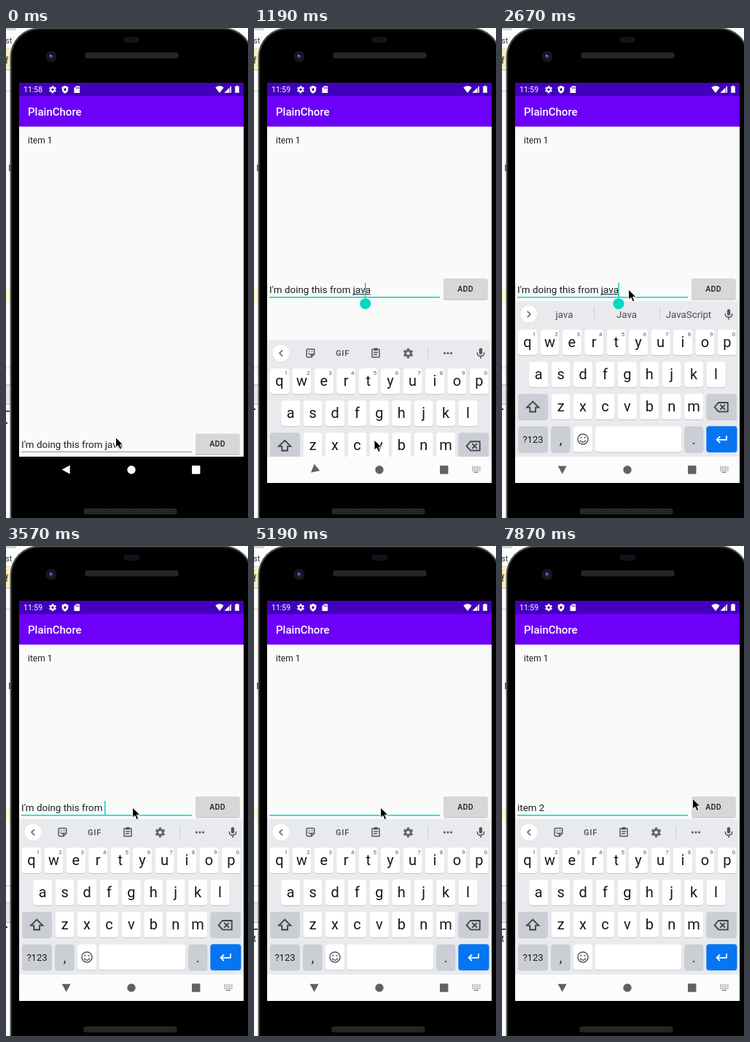
An HTML page that plays this animation: 332x671 px, repeating every 8 s.

```html
<!DOCTYPE html>
<html lang="en">
<head>
<meta charset="utf-8">
<title>Todo app demo</title>
<style>
  html, body { margin: 0; width: 100%; height: 100%; overflow: hidden; background: #fff; }
  svg { display: block; width: 100vw; height: 100vh; font-family: Roboto, "Noto Sans", sans-serif; }
  text { white-space: pre; }
  .mid { text-anchor: middle; }
  .line { fill: none; stroke: currentColor; stroke-width: 1.5; stroke-linejoin: round; stroke-linecap: round; }
  .bold .line { stroke-width: 1.8; stroke-linejoin: miter; }
</style>
</head>
<body>
<svg id="stage" viewBox="0 0 332 671" preserveAspectRatio="xMinYMin meet"></svg>
<script>
const LOOP = 8000, LIFT = 212.5, FIELD_X = 21, FIELD_SIZE = 13.43;
const TEAL = '#00d8c2';
const FULL = "I'm doing this from java";

const rect = (x, y, w, h, fill, r = 0) =>
  `<rect x="${x}" y="${y}" width="${w}" height="${h}" rx="${r}" fill="${fill}"/>`;
const circle = (x, y, r, fill) => `<circle cx="${x}" cy="${y}" r="${r}" fill="${fill}"/>`;
const path = (d, fill) => `<path d="${d}" fill="${fill}"/>`;
const stroke = d => `<path class="line" d="${d}"/>`;
const text = (x, y, size, fill, str, extra = '') =>
  `<text x="${x}" y="${y}" font-size="${size}" fill="${fill}" ${extra}>${str}</text>`;
const group = (id, body, extra = '') => `<g id="${id}" ${extra}>${body}</g>`;
const at = (x, y, body) => `<g transform="translate(${x} ${y})">${body}</g>`;
const MID = 'class="mid"';

function gear(r, fill, hole) {
  let teeth = '';
  for (let a = 0; a < 360; a += 60)
    teeth += `<rect x="${-r * .24}" y="${-r}" width="${r * .48}" height="${r}" fill="${fill}" transform="rotate(${a})"/>`;
  return teeth + circle(0, 0, r * .74, fill) + circle(0, 0, r * .34, hole);
}

// Editor window that peeks out behind the phone
function backdrop() {
  return rect(0, 0, 332, 671, '#fdfdfd') +
    rect(0, 0, 14, 3, '#d4d4d4') + rect(0, 28, 8, 1, '#c9c9c9') +
    text(-1, 21, 11, '#333', 'st') +
    rect(0, 30, 7, 27, '#fdf0bd') + text(-1, 49, 12, '#222', 'f') +
    rect(0, 57, 7, 1, '#bbb') + rect(0, 86, 7, 1, '#ccc') +
    rect(0, 359, 6, 15, '#fcfbd0') +
    rect(0, 465, 6, 1, '#ccc') + rect(0, 488, 6, 28, '#e6e6e6') + rect(0, 488, 6, 1, '#bbb') + rect(0, 515, 6, 1, '#bbb') +
    group('strip0', rect(0, 524, 5, 1.5, '#111') + rect(0, 540, 2, 2, '#2929a0')) +
    group('strip1', rect(0, 521, 2, 2, '#2929a0')) +
    group('strip2', rect(0, 632, 5, 1.5, '#111') + text(-1, 650, 12, '#222', 't')) +
    group('strip3', rect(0, 524, 5, 1.5, '#111') + text(-1, 542, 12, '#222', 't'));
}

function speaker(x, y) {
  return rect(x, y, 128, 8, '#2a2a2a', 3) + rect(x + 1, y + 1, 126, 6, 'url(#mesh)', 2);
}

function phone() {
  return `<defs>
    <pattern id="mesh" width="3" height="3" patternUnits="userSpaceOnUse">
      <rect width="3" height="3" fill="#2b2b2b"/><rect width="1.5" height="1.5" fill="#161616"/></pattern>
    <radialGradient id="lens"><stop offset="0" stop-color="#3d4f8e"/><stop offset=".38" stop-color="#1c2750"/>
      <stop offset=".55" stop-color="#101118"/><stop offset="1" stop-color="#1d1d20"/></radialGradient></defs>` +
    rect(4, 187, 4, 9, '#555') +
    rect(5.5, -.5, 333, 740, '#5a5a5a', 40) + rect(7, 1, 330, 737, '#1f1f1f', 38.5) +
    rect(8.5, 2.5, 327, 734, '#000', 37) +
    rect(161, 12, 22, 8, '#12121c', 4) +
    speaker(108.5, 33.5) + speaker(106.5, 658) +
    circle(62, 39, 7.4, 'url(#lens)') + circle(61, 38, 1.2, '#7f93d2');
}

function statusBar() {
  const bar = '#4300bc';
  return rect(18, 75, 308, 18, bar) +
    text(24, 88, 10.5, '#fff', '11:58', 'id="clock"') +
    at(64, 84.3, gear(5, '#fff', bar)) +
    path('M81 79l4.3 1.7v3.4c0 2.6-1.8 4.6-4.3 5.6-2.5-1-4.3-3-4.3-5.6v-3.4z', '#fff') +
    path('M81 82l2 2-2 2.8-2-2.8z', bar) +
    path('M96.2 79.5h4.3q.7 0 .7.7v8q0 .7-.7.7h-6.4q-.7 0-.7-.7v-5.8z', '#fff') +
    rect(96, 81.2, .9, 2, bar) + rect(97.7, 81.2, .9, 2, bar) + rect(99.3, 81.2, .9, 2, bar) +
    path('M287.3 81.5q5.7-4.5 11.4 0L293 89z', '#fff') +
    path('M309 79.3v9.5h-9.6z', '#fff') + rect(306.6, 80, .8, 9, bar) +
    path('M315.7 79h2.6v1h1.5v8.8h-5.6V80h1.5z', '#fff');
}

function field() {
  return rect(18, 549, 308, 38, '#fafafa') +
    group('rule', rect(FIELD_X, 580, 234, 1, '#8d8d8d')) +
    group('ruleOn', rect(FIELD_X, 580.5, 234, 1.5, TEAL)) +
    text(FIELD_X, 575, FIELD_SIZE, '#1f1f1f', '', 'id="entry"') +
    '<rect id="under" y="576.6" height="1" fill="#222"/>' +
    '<rect id="caret" y="561.5" width="1.4" height="19" fill="#00c9b5"/>' +
    rect(260, 556, 60.5, 29, '#bdbdbd', 2) + rect(260, 555.5, 60, 28.5, '#d6d7d7', 1.5) +
    text(290, 573.3, 10.5, '#1c1c1c', 'ADD', MID + ' font-weight="500" letter-spacing=".3"');
}

function key(cx, y, w, label, fill = '#fff', size = 20) {
  const x = cx - w / 2;
  return rect(x, y + 1, w, 35, '#c3c5ca', 4) + rect(x, y, w, 35, fill, 4) +
    (label ? text(cx, y + (size < 16 ? 22.5 : 24), size, '#17181a', label, MID) : '');
}

function keyRow(letters, x, y, digits) {
  return [...letters].map((c, i) => {
    const cx = x + 30.42 * i;
    return key(cx, y, 26, c) + (digits ? text(cx + 9, y + 9, 8, '#55585e', (i + 1) % 10, MID) : '');
  }).join('');
}

function toolbar() {
  return group('tools',
    stroke('M72.2 388q0-1.4 1.4-1.4h7.8q1.4 0 1.4 1.4v5.5l-4 4h-5.2q-1.4 0-1.4-1.4zM82.6 393.4h-2.6q-1.2 0-1.2 1.2v2.6M75 392.4q2 2.8 4.4.6') +
    circle(75.6, 389.8, .9, 'currentColor') + circle(79.6, 389.8, .9, 'currentColor') +
    text(121.5, 396, 11.2, '#5f6368', 'GIF', MID + ' font-weight="700" letter-spacing=".7"') +
    stroke('M162 387h10v10.5h-10zM164.5 391h5M164.5 394h4') + rect(164.2, 385, 5.6, 3.4, 'currentColor', 1) +
    at(211.5, 392.3, gear(6.8, '#5f6368', '#e8eaed')) +
    rect(238, 384, 1, 16, '#cdd0d4') +
    [261.5, 266, 270.5].map(x => circle(x, 392, 1.5, 'currentColor')).join('')) +
    group('hints', rect(126, 383, 1, 18, '#cdd0d4') + rect(216, 383, 1, 18, '#cdd0d4') +
      [85.5, 171, 256].map((x, i) => text(x, 397, 13.3, '#464a50', '', `${MID} id="hint${i}"`)).join('')) +
    circle(37, 392.6, 11.7, '#d4d6da') + circle(37, 392, 11.5, '#fff') +
    group('chevron', stroke('M1.8 -3.8L-2 0L1.8 3.8')) +
    rect(308.8, 385, 4.4, 8.6, 'currentColor', 2.2) +
    stroke('M306.3 391.4q0 4.6 4.7 4.6t4.7-4.6M311 396.4v2.6');
}

function keyboard() {
  const grey = '#ccced5';
  return rect(18, 374, 308, 213, '#e8eaed') + toolbar() +
    keyRow('qwertyuiop', 35, 413, true) + keyRow('asdfghjkl', 50.2, 457) + keyRow('zxcvbnm', 80.6, 501) +
    key(42.5, 501, 41, '', grey) + key(301.3, 501, 41.5, '', grey) +
    '<g class="bold" color="#3f4247">' +
    stroke('M42.2 511.5l8.2 8.2h-4.3v5.8h-7.8v-5.8h-4.3z') +
    stroke('M297 513h12.8v12.4H297l-5.4-6.2zM299.7 516.3l5.8 5.8M305.5 516.3l-5.8 5.8') + '</g>' +
    key(42.5, 545.5, 41, '?123', grey, 13) + key(80.4, 545.5, 26, ',', grey, 18) +
    key(110.9, 545.5, 26, '') + '<circle class="line" cx="111" cy="563" r="7"/>' + stroke('M107.4 565q3.6 4.4 7.2 0') +
    circle(108.5, 561, 1, 'currentColor') + circle(113.5, 561, 1, 'currentColor') +
    key(187, 545.5, 118, '') + key(263.2, 545.5, 26, '.', grey, 18) +
    rect(280.3, 545.2, 42.2, 36, '#0675f2', 4) +
    '<g class="bold" color="#fff">' + stroke('M308 559v4.8h-13M298.5 560l-3.8 3.8 3.8 3.8') + '</g>';
}

function navBar() {
  const dots = [];
  for (let i = 0; i < 15; i++)
    dots.push(rect(299.1 + (i % 5) * 2.5, 600.5 + Math.floor(i / 5) * 2.4, 1.4, 1.4, 'currentColor'));
  return '<rect id="navBg" x="18" y="587" width="308" height="36"/>' +
    group('back', path('M-6 0L5 -6V6Z', 'currentColor')) +
    circle(172, 605, 5.7, 'currentColor') + rect(255, 599.3, 11.4, 11.4, 'currentColor', 1) +
    group('kbIcon', dots.join('') + rect(301.6, 607.7, 6.4, 1.3, 'currentColor'), 'opacity=".8"');
}

const stage = document.getElementById('stage');
stage.innerHTML = backdrop() + phone() +
  '<clipPath id="screen"><rect x="18" y="75" width="308" height="548"/></clipPath><g clip-path="url(#screen)">' +
  rect(18, 135, 308, 452, '#fafafa') + statusBar() +
  rect(18, 93, 308, 42, '#6c00f8') +
  text(30, 120, 15, '#fff', 'PlainChore', 'font-weight="500"') +
  text(30, 157.5, 12, '#222', 'item 1') +
  group('field', field()) + group('keys', keyboard(), 'color="#54585e"') +
  group('nav', navBar()) +
  group('handle', path('M0 -7.8L5.4 -5.4A7.6 7.6 0 1 1 -5.4 -5.4Z', TEAL)) + '</g>' +
  group('mouse', '<path d="M0 0V14.2L3.3 11.2L5.6 16.6L8.3 15.5L6 10.2H10.4Z" fill="#000" stroke="#fff" stroke-width="1" stroke-linejoin="round"/>');

const el = {};
stage.querySelectorAll('[id]').forEach(n => el[n.id] = n);
const pen = document.createElement('canvas').getContext('2d');
pen.font = `${FIELD_SIZE}px Roboto, "Noto Sans", sans-serif`;
const widthOf = s => pen.measureText(s).width;

// Each step changes only the listed properties.
const start = { entry: FULL, pos: null, focus: false, caret: false, handle: false, lift: 0, turn: 0,
                hints: null, strip: 0, mouse: [150.5, 560.5] };
const typed = n => ({ entry: FULL.slice(0, n) });
const steps = [
  [150, { mouse: [150.5, 563] }],
  [300, { mouse: [152, 565] }],
  [740, { focus: true, caret: true, handle: true, pos: 23, strip: 1 }],
  [890, { mouse: [160, 565] }],
  [1040, { mouse: [166.5, 564] }],
  [1190, { lift: .75, turn: -40, mouse: [165, 564] }],
  [1330, { lift: 1, turn: -75, caret: false, mouse: [163.5, 563] }],
  [1480, { turn: -90, caret: true, mouse: [166, 510] }],
  [1630, { hints: ['java', 'Java', 'JavaScript'], mouse: [170, 430] }],
  [1780, { mouse: [173, 375] }],
  [1930, { caret: false, mouse: [174, 362] }],
  [2080, { mouse: [173.5, 358] }],
  [2380, { caret: true }],
  [2530, { pos: null }],
  [3270, { ...typed(23), handle: false, hints: ['jav', 'Java', 'have'] }],
  [3420, { ...typed(22), hints: null }],
  [3570, typed(20)],
  [3720, { ...typed(18), strip: 2 }],
  [3860, typed(16)],
  [4010, typed(13)],
  [4160, typed(10)],
  [4300, typed(7)],
  [4450, { ...typed(3), hints: ["I'm", 'I', "I'll"] }],
  [4600, { ...typed(1), strip: 3 }],
  [4750, { ...typed(0), hints: null, caret: false }],
  [4890, { caret: true }],
  [5190, { caret: false }],
  [5640, { caret: true }],
  [5790, { entry: 'i' }],
  [5940, { hints: ['I', 'is', 'in'] }],
  [6240, { entry: 'it' }],
  [6380, { entry: 'ite', hints: ['it', "it's", 'if'] }],
  [6680, { entry: 'item' }],
  [6820, { hints: ['item', 'items', 'itemized'] }],
  [6970, { caret: false }],
  [7270, { entry: 'item ', caret: true, hints: null }],
  [7570, { entry: 'item 2' }],
  [7720, { mouse: [222, 351] }],
  [7870, { caret: false, mouse: [261.5, 346] }]
];

const show = (node, on) => node.setAttribute('display', on ? 'inline' : 'none');
const move = (node, x, y, more = '') => node.setAttribute('transform', `translate(${x} ${y}) ${more}`);

function render(t) {
  const s = { ...start };
  for (const [time, change] of steps) if (t >= time) Object.assign(s, change);
  const up = s.lift > 0;
  const caretX = FIELD_X + widthOf(s.entry.slice(0, s.pos ?? s.entry.length));
  const word = s.focus ? (s.entry.match(/[a-z']+$/i) || [''])[0] : '';

  el.clock.textContent = s.focus ? '11:59' : '11:58';
  el.entry.textContent = s.entry;
  el.under.setAttribute('x', FIELD_X + widthOf(s.entry) - widthOf(word));
  el.under.setAttribute('width', widthOf(word));
  el.caret.setAttribute('x', caretX - .7);
  show(el.caret, s.caret);
  show(el.rule, !s.focus);
  show(el.ruleOn, s.focus);
  move(el.field, 0, up ? -LIFT : 0);

  show(el.keys, up);
  move(el.keys, 0, (1 - s.lift) * 213);
  show(el.tools, !s.hints);
  show(el.hints, s.hints);
  (s.hints || []).forEach((h, i) => el['hint' + i].textContent = h);
  move(el.chevron, 37, 392, s.hints ? 'rotate(180)' : '');

  el.navBg.setAttribute('fill', up ? '#fcfcfc' : '#000');
  el.nav.setAttribute('color', up ? '#626262' : '#fff');
  move(el.back, 82.7, 604.8, `rotate(${s.turn})`);
  show(el.kbIcon, s.focus);

  show(el.handle, s.handle);
  move(el.handle, caretX, 590 - (up ? LIFT : 0));
  for (let i = 0; i < 4; i++) show(el['strip' + i], i === s.strip);
  move(el.mouse, ...s.mouse);
}

function tick() {
  render(performance.now() % LOOP);
  requestAnimationFrame(tick);
}
tick();
</script>
</body>
</html>
```
